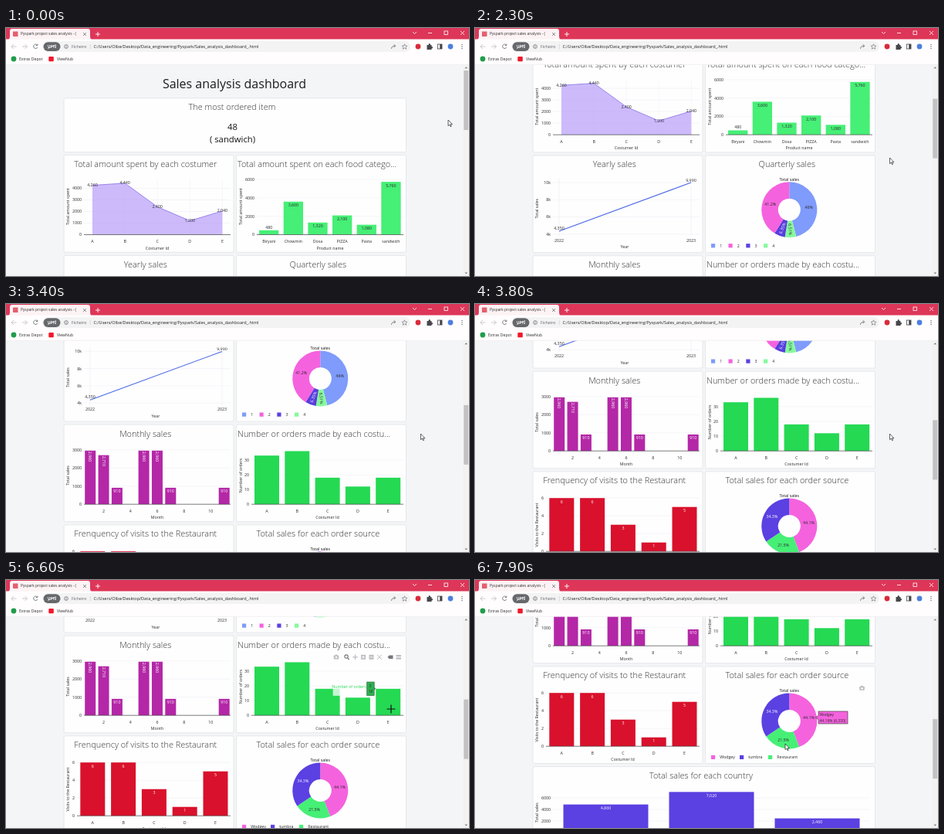
An HTML page for the animation above (8 s loop, 600 by 321 pixels).

```html
<!DOCTYPE html>
<html lang="en">
<head>
<meta charset="utf-8">
<title>Sales analysis dashboard</title>
<style>
  html, body { margin: 0; width: 100%; height: 100%; overflow: hidden; background: #f4f5f7; }
  svg { display: block; width: 600px; height: 321px; }
  text { font-family: "Open Sans", "Noto Sans", sans-serif; white-space: pre; }
</style>
</head>
<body>
<svg id="stage" viewBox="0 0 600 321" xmlns="http://www.w3.org/2000/svg">
  <rect width="600" height="321" fill="#f4f5f7"/>
  <g id="page"></g>
  <g id="chrome"></g>
  <g id="cursor"></g>
</svg>
<script>
const LOOP = 8000, STEP = 100;
const INK = '#2b2b2b', PINK = '#f562de', PURPLE = '#5b40e2', BLUE = '#7f9bfb', LIME = '#46ef76', GREEN = '#25d953';
const $ = id => document.getElementById(id);

// ---- drawing helpers (text is placed by its visual centre line) ----
function text(x, y, str, o = {}) {
  const { size = 5.3, fill = INK, anchor = 'middle', turn = 0, weight = 400 } = o;
  const spin = turn ? ` transform="rotate(${turn} ${x} ${y})"` : '';
  return `<text x="${x}" y="${y + size * 0.36}" font-size="${size}" fill="${fill}" text-anchor="${anchor}" font-weight="${weight}"${spin}>${str}</text>`;
}
const rect = (x, y, w, h, fill, extra = '') =>
  `<rect x="${x}" y="${y}" width="${w}" height="${h}" fill="${fill}" ${extra}/>`;
const path = (d, stroke, width = 0.8, fill = 'none', extra = '') =>
  `<path d="${d}" stroke="${stroke}" stroke-width="${width}" fill="${fill}" ${extra}/>`;
const dot = (x, y, r, fill, extra = '') => `<circle cx="${x}" cy="${y}" r="${r}" fill="${fill}" ${extra}/>`;
const hline = (x0, x1, y, color, width = 0.6) => path(`M${x0} ${y}H${x1}`, color, width);
const commas = n => n.toLocaleString('en-US');

const card = (x, y, w, h) =>
  rect(x, y, w, h, '#fefeff', 'rx="2" stroke="#e1e2e6" stroke-width=".8"');
const heading = (x, y, str, anchor) =>
  text(x, y, str, { size: 10.95, weight: 300, fill: '#333', anchor });

const ROW = i => 164.6 + 129.75 * i;
const HEAD = 11.5, LEFT = 75, RIGHT = 298.5;

function panel(col, row, title, body, long) {
  const x = col ? RIGHT : LEFT, y = ROW(row);
  return card(x, y, 220, 125.7) +
    (long ? heading(300, y + HEAD, title, 'start') : heading(col ? 404.4 : 180.8, y + HEAD, title)) + body;
}

// Axes: y0 is the pixel of value zero, k the pixels per unit.
function axes({ x0, x1, y0, k, ticks, cats, xTitle, yTitle, titleX, titleY }) {
  let s = '';
  for (const t of ticks) {
    const y = y0 - t * k;
    if (t) s += hline(x0, x1, y, '#efeff3');
    s += text(x0 - 3, y, t, { anchor: 'end' });
  }
  for (const [x, name] of cats) s += text(x, y0 + 8.5, name);
  return s + text((x0 + x1) / 2, y0 + 17.3, xTitle) + text(titleX, titleY, yTitle, { turn: -90 });
}

function bars({ y0, k, items, w, fill, ink, outside = 0, upright = Infinity }) {
  return items.map(([x, v]) => {
    const top = y0 - v * k;
    let s = rect(x - w / 2, top, w, v * k, fill);
    if (!ink) return s;
    if (v < outside) s += text(x, top - 4, commas(v));
    else if (v > upright) s += text(x, top + 7.8, commas(v), { fill: ink, turn: 90 });
    else s += text(x, top + 4.7, commas(v), { fill: ink });
    return s;
  }).join('');
}

function donut(cx, cy, parts) {
  const R = 36, r = 14.5;
  let a = 0, s = '';
  const at = (angle, q) => `${cx + q * Math.sin(angle)} ${cy - q * Math.cos(angle)}`;
  for (const { share, fill, ink = INK, label, tilt } of parts) {
    const b = a + share / 100 * 2 * Math.PI, big = share > 50 ? 1 : 0, mid = (a + b) / 2;
    s += path(`M${at(a, R)}A${R} ${R} 0 ${big} 1 ${at(b, R)}L${at(b, r)}A${r} ${r} 0 ${big} 0 ${at(a, r)}Z`, 'none', 0, fill);
    s += text(cx + 25.5 * Math.sin(mid), cy - 25.5 * Math.cos(mid), label, { fill: ink, turn: tilt || 0 });
    a = b;
  }
  return s + text(cx, cy - 39.5, 'Total sales', { fill: '#111' });
}
const legend = (y, items) => items.map(([x, fill, name]) =>
  rect(x, y - 2.5, 5.2, 5.2, fill) + text(x + 11.2, y, name, { anchor: 'start' })).join('');

const spread = (names, first, step) => names.map((n, i) => [first + i * step, n]);
const pair = (cats, values) => cats.map(([x], i) => [x, values[i]]);
const LETTERS = [...'ABCDE'];

// ---- dashboard charts ----
function costumerArea() {
  const y0 = 267.5, k = 0.015, cats = spread(LETTERS, 112, 42.1);
  const points = pair(cats, [4260, 4440, 2400, 1200, 2040]);
  const line = points.map(([x, v]) => `${x} ${y0 - v * k}`).join('L');
  return axes({ x0: 101, x1: 291, y0, k, ticks: [0, 1000, 2000, 3000, 4000], cats,
      xTitle: 'Costumer Id', yTitle: 'Total amount spent', titleX: 80, titleY: 231 }) +
    cats.map(([x]) => path(`M${x} 196V${y0}`, '#f1f1f4', 0.6)).join('') +
    path(`M112 ${y0}L${line}V${y0}Z`, 'none', 0, '#b79bfa', 'fill-opacity=".68"') +
    path('M' + line, '#9a84ec', 1) + hline(101, 291, y0, '#444', 0.7) +
    points.map(([x, v]) => text(x, y0 - v * k - 0.4, commas(v))).join('');
}

function foodBars() {
  const y0 = 267.5, k = 0.01187;
  const cats = spread(['Biryani', 'Chowmin', 'Dosa', 'PIZZA', 'Pasta', 'sandwich'], 340.7, 31.65);
  return axes({ x0: 325, x1: 515, y0, k, ticks: [0, 2000, 4000, 6000], cats,
      xTitle: 'Product name', yTitle: 'Total amount spent', titleX: 304, titleY: 231 }) +
    bars({ y0, k, items: pair(cats, [480, 3600, 1320, 2100, 1080, 5760]), w: 25.3, fill: LIME, ink: INK, outside: 500 }) +
    hline(325, 515, y0, '#444', 0.7);
}

function yearlyLine() {
  const y = k => 329.3 + (10 - k) * 11.15;
  let s = [4, 6, 8, 10].map(k => hline(101, 291, y(k), '#efeff3') +
    text(98, y(k), k + 'k', { anchor: 'end' })).join('');
  for (const [x, year] of [[109, 2022], [280, 2023]])
    s += path(`M${x} 324V399`, '#efeff3', 0.6) + text(x, 404.5, year);
  return s + path(`M109 ${y(4.35)}L280 ${y(9.99)}`, '#4866e4', 1.1) +
    text(109, 388.3, '4,350') +
    `<clipPath id="top"><rect x="101" y="324.6" width="195" height="80"/></clipPath><g clip-path="url(#top)">${text(280, 326, '9,990')}</g>` +
    text(194, 412.8, 'Year') + text(80, 363, 'Total sales', { turn: -90 });
}

function monthlyBars() {
  const y0 = 527.2, k = 0.02345, at = m => 91.85 + m * 17.35;
  const sales = [[1, 2960], [2, 2710], [3, 910], [5, 2960], [6, 2960], [7, 910], [11, 910]];
  return axes({ x0: 101, x1: 291, y0, k, ticks: [0, 1000, 2000, 3000], cats: [2, 4, 6, 8, 10].map(m => [at(m), m]),
      xTitle: 'Month', yTitle: 'Total sales', titleX: 80, titleY: 490 }) +
    bars({ y0, k, items: sales.map(([m, v]) => [at(m), v]), w: 14, fill: '#b427a7', ink: '#fff', upright: 2000 }) +
    hline(101, 291, y0, '#444', 0.7);
}

const ORDERS = { y0: 527.2, k: 1.91, w: 32, cats: spread(LETTERS, 338, 39.3), values: [33, 36, 18, 12, 18] };
function orderBars() {
  const { y0, k, w, cats, values } = ORDERS;
  return axes({ x0: 318, x1: 515, y0, k, ticks: [0, 10, 20, 30], cats,
      xTitle: 'Costumer Id', yTitle: 'Number of orders', titleX: 304, titleY: 490 }) +
    bars({ y0, k, items: pair(cats, values), w, fill: GREEN }) + hline(318, 515, y0, '#444', 0.7);
}

function visitBars() {
  const y0 = 657.2, k = 11.5, cats = spread(LETTERS, 112.3, 39.8);
  return axes({ x0: 92, x1: 291, y0, k, ticks: [0, 2, 4, 6], cats,
      xTitle: 'Costumer Id', yTitle: 'Visits to the Restaurant', titleX: 80, titleY: 623 }) +
    bars({ y0, k, items: pair(cats, [6, 6, 3, 1, 5]), w: 32, fill: '#d9112c', ink: '#fff' }) +
    hline(92, 291, y0, '#444', 0.7);
}

function countryBars() {
  const y0 = 769, k = 0.0075, items = [[169.5, 4860], [306.5, 7020], [443.5, 2460]];
  return card(LEFT, ROW(4), 443.5, 125.7) + heading(293, ROW(4) + HEAD, 'Total sales for each country') +
    axes({ x0: 101, x1: 512, y0, k, ticks: [0, 2000, 4000, 6000], cats: [], xTitle: 'Country',
      yTitle: 'Total sales', titleX: 80, titleY: 743 }) +
    bars({ y0, k, items, w: 110, fill: PURPLE, ink: '#fff' });
}

function buildPage() {
  const total = { size: 11.3, fill: '#161616' };
  return text(296, 71.8, 'Sales analysis dashboard', { size: 16, fill: '#1c1c1c' }) +
    card(LEFT, 90.8, 443.5, 70) + heading(293, 102.2, 'The most ordered item') +
    text(293.5, 128.3, '48', total) + text(293.5, 144.3, '( sandwich)', total) +
    panel(0, 0, 'Total amount spent by each costumer', costumerArea()) +
    panel(1, 0, 'Total amount spent on each food catego...', foodBars(), true) +
    panel(0, 1, 'Yearly sales', yearlyLine()) +
    panel(1, 1, 'Quarterly sales', donut(407.3, 364.5, [
      { share: 46, fill: BLUE, label: '46%' },
      { share: 6.51, fill: '#86f99c', label: '6.51%', tilt: 87 },
      { share: 6.35, fill: '#563fdd', label: '6.35%', tilt: -69, ink: '#fff' },
      { share: 41.14, fill: PINK, label: '41.2%' }]) +
      legend(411, [[306, BLUE, 1], [328.5, PINK, 2], [351.3, PURPLE, 3], [374, '#86f99c', 4]])) +
    panel(0, 2, 'Monthly sales', monthlyBars()) +
    panel(1, 2, 'Number or orders made by each costu...', orderBars(), true) +
    panel(0, 3, 'Frenquency of visits to the Restaurant', visitBars()) +
    panel(1, 3, 'Total sales for each order source', donut(407.3, 624.5, [
      { share: 44.16, fill: PINK, label: '44.1%' },
      { share: 21.5, fill: LIME, label: '21.5%' },
      { share: 34.34, fill: PURPLE, label: '34.3%', ink: '#fff' }]) +
      legend(671.3, [[306, PINK, 'Wodgey'], [343, PURPLE, 'tumbra'], [380, LIME, 'Restaurant']])) +
    countryBars() + '<g id="hover"></g>';
}

// ---- browser window ----
function buildChrome() {
  const grey = '#5f6368', pale = '#bcbcc0', chromeText = { anchor: 'start', size: 5.1 };
  return rect(0, 0, 600, 15, '#dd3658') +
    path('M3 15Q5 14 5 11V4Q5 1 8 1H106Q109 1 109 4V11Q109 14 111 15Z', 'none', 0, '#fdf3f5') +
    rect(9, 4.5, 6.5, 6.5, '#e5606f') +
    text(19, 7.6, 'Pyspark project sales analysis - (', { anchor: 'start', size: 4.85 }) +
    path('M100 6l4 4m0-4l-4 4', grey, 0.7) + path('M119 5v6m-3-3h6', '#fff', 0.9) +
    path('M527 5l2.5 2.5L532 5M547 6.5h5M589 4l5 5m0-5l-5 5', '#fff', 0.8) +
    rect(568, 4, 4.5, 4.5, 'none', 'stroke="#fff" stroke-width=".8"') +
    rect(0, 14.5, 600, 33, '#fffdfd') + rect(47, 17, 477, 14, '#f4f3f4', 'rx="7"') +
    path('M13.5 24H7m3-3l-3 3 3 3', pale, 0.8) + path('M21 24h6.5m-3-3l3 3-3 3', pale, 0.8) +
    path('M40.6 22.2A2.7 2.7 0 1 0 40.8 25M40.9 20.6v2H38.8', grey, 0.8) +
    rect(48.5, 18.2, 22, 11.8, '#66686c', 'rx="5.9"') +
    text(59.5, 24, 'VPN', { size: 5.6, fill: '#fff', weight: 600 }) + path('M54 26.5L65 21.5', '#fff', 0.7) +
    dot(78, 24, 2.4, 'none', `stroke="${grey}" stroke-width=".7"`) + path('M78 23.5v2M78 22v.7', grey, 0.7) +
    text(85, 24, 'Ficheiro', { anchor: 'start', size: 5.3, fill: grey }) + path('M109.3 21v6', '#c8c8cc', 0.6) +
    text(113.6, 24, 'C:/Users/Olbe/Desktop/Data_engineering/Pyspark/Sales_analysis_dashboard_.html',
      { anchor: 'start', size: 5.55, fill: '#222' }) +
    path('M499.5 26.8q0-3.6 5-3.6m-1.8-2l2 2-2 2', grey, 0.8) +
    path('M516.5 20.8l1 2.2 2.4.2-1.8 1.6.6 2.4-2.2-1.3-2.2 1.3.6-2.4-1.8-1.6 2.4-.2Z', grey, 0.6) +
    dot(534, 24, 3.4, '#d92b3a') +
    path('M545.5 22h2q0-2 1.3-2t1.2 2h1.5v2q1.6 0 1.6 1.2T551.5 26.5v1.5h-6Z', 'none', 0, '#45474b') +
    rect(559.5, 21, 5.5, 6, 'none', 'stroke="#45474b" stroke-width=".8"') + rect(562.2, 21, 2.8, 6, '#45474b') +
    dot(576, 24, 3.4, '#4c7fe0') +
    [21.5, 24, 26.5].map(y => dot(591, y, 0.7, grey)).join('') +
    dot(10, 40, 3.4, '#1f9d4c') + text(17, 39.8, 'Extras Depot', chromeText) +
    rect(55.3, 37, 6.5, 6.2, '#f0182c', 'rx="1"') + text(66, 39.8, 'ViewNub', chromeText) +
    hline(0, 600, 47.3, '#e4e1e4', 0.5) +
    rect(592.3, 47.5, 7.7, 274, '#f2f2f3') + rect(593.2, 55, 6, 77, '#c2c2c4', 'id="thumb"') +
    path('M594.5 52.3l1.8-2 1.8 2Z', 'none', 0, '#777') + path('M594.5 316.5l1.8 2 1.8-2Z', 'none', 0, '#777');
}

// ---- hover pieces ----
const camera = (x, y) => rect(x - 3.3, y - 2.2, 6.6, 5, '#bdbdc2', 'rx=".8"') +
  rect(x - 1.3, y - 3.2, 2.6, 1.5, '#bdbdc2') + dot(x, y + 0.2, 1.3, '#fff');

function modeBar(y) {
  const soft = '#bdbdc2', dark = '#77777c';
  return camera(428, y) +
    dot(441, y - 0.7, 2.2, 'none', `stroke="${dark}" stroke-width="1.1"`) + path(`M442.6 ${y + 1}l2 2.2`, dark, 1.2) +
    path(`M452.5 ${y - 3.3}v6.6m-3.3-3.3h6.6`, soft, 1.2) +
    [463, 473.5].map(x => rect(x - 3, y - 3, 6, 6, soft)).join('') +
    path(`M463 ${y - 2}v4m-2-2h4M471.5 ${y}h4`, '#fff', 0.9) +
    path(`M481 ${y - 3}l6 6m0-6l-6 6`, soft, 1) +
    path(`M494.5 ${y}l2-2.2h5v4.4h-5Z`, 'none', 0, dark) +
    rect(505.5, y - 2.8, 6.5, 2.2, soft) + rect(505.5, y + 0.6, 6.5, 2.2, soft);
}

function orderLabel(i) {
  const { y0, k, w, cats, values } = ORDERS;
  const side = i > 2 ? -1 : 1, edge = cats[i][0] + side * w / 2, y = y0 - values[i] * k;
  const boxX = side > 0 ? edge + 2 : edge - 11.5, nameX = edge + side * 12.5;
  return rect(side > 0 ? nameX - 4 : nameX - 43, y - 4, 46, 13, '#fff', 'opacity=".75"') +
    path(`M${edge} ${y}l${side * 2.5} -2v4Z`, 'none', 0, '#2b7a40') +
    rect(boxX, y - 8.8, 9.5, 17.6, '#2bb04f', 'stroke="#3a6b48" stroke-width=".7"') +
    text(boxX + 4.7, y - 3, LETTERS[i], { size: 4.6 }) + text(boxX + 4.7, y + 3.5, values[i], { size: 4.6 }) +
    text(nameX, y - 2.5, 'Number of orders', { fill: GREEN, anchor: side > 0 ? 'start' : 'end' });
}

const sliceLabel = () =>
  path('M441 620l4-2.5V612H483V628H445V622.5Z', '#444', 0.7, PINK) +
  text(446.5, 616.6, 'Wodgey', { anchor: 'start', size: 5 }) +
  text(446.5, 623.8, '44.16% (6,330)', { anchor: 'start', size: 5 });

// ---- motion ----
const SCROLL = [[0, 0], [1400, 0], [1600, 26], [1900, 50], [2200, 108], [2500, 172], [2800, 217], [3100, 217],
  [3400, 268], [3800, 337], [4000, 352], [6900, 352], [7400, 442]];
const POINTER = [[0, 573, 119], [200, 573, 119], [900, 537.5, 168], [4000, 537.5, 168], [4600, 357, 169],
  [4800, 357, 169], [6400, 499, 167], [6800, 499, 167], [7400, 434, 176], [7600, 430, 180], [7900, 402, 212]];

function sample(keys, t, col, smooth) {
  const i = keys.findIndex(key => key[0] > t);
  if (i < 0) return keys[keys.length - 1][col];
  const a = keys[i - 1], b = keys[i];
  let u = (t - a[0]) / (b[0] - a[0]);
  if (smooth) u = u * u * (3 - 2 * u);
  return a[col] + (b[col] - a[col]) * u;
}

const ARROW = path('M0 0V7.6L1.8 6 3 8.7 4.2 8.2 3.1 5.6H5.4Z', '#222', 0.7, '#fff');
const CROSS = path('M0 -5.5V5.5M-5.5 0H5.5', '#111', 1.2);

function draw(t) {
  const scroll = sample(SCROLL, t, 1);
  const x = sample(POINTER, t, 1, true), y = sample(POINTER, t, 2, true), pageY = y + scroll;
  const within = (x0, x1, y0, y1) => x > x0 && x < x1 && pageY > y0 && pageY < y1;
  const overOrders = within(318, 515, 445, 527.2);

  $('page').setAttribute('transform', `translate(0 ${-scroll})`);
  $('thumb').setAttribute('y', 55 + scroll * 0.283);

  let hover = '';
  if (within(RIGHT, 518, 445, 550)) hover += modeBar(451.8);
  if (overOrders) {
    const gaps = ORDERS.cats.map(([cx]) => Math.abs(cx - x));
    hover += orderLabel(gaps.indexOf(Math.min(...gaps)));
  }
  if (within(RIGHT, 518, 554, 680)) hover += camera(501.5, 582);
  if (t >= 7500) hover += sliceLabel();
  $('hover').innerHTML = hover;

  $('cursor').innerHTML = overOrders ? CROSS : ARROW;
  $('cursor').setAttribute('transform', `translate(${x} ${y})`);
}

$('page').innerHTML = buildPage();
$('chrome').innerHTML = buildChrome();
const start = performance.now();
function tick() {
  const t = (performance.now() - start) % LOOP;
  draw(Math.floor(t / STEP) * STEP);
  requestAnimationFrame(tick);
}
tick();
</script>
</body>
</html>
```
